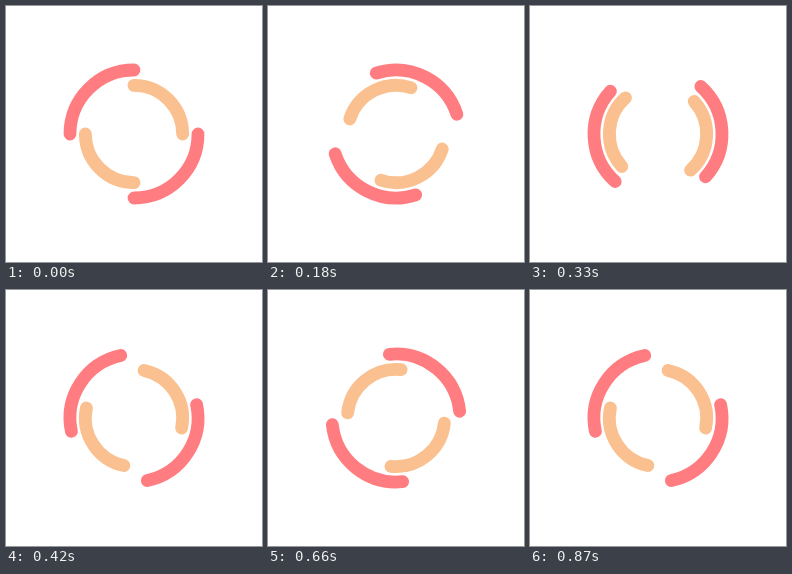
Write an HTML page that moves like this. It is 256 px wide and 256 px high and loops after 900 ms.

```html
<!DOCTYPE html>
<html lang="en">
<head>
<meta charset="utf-8">
<title>Double ring spinner</title>
<style>
  html, body { margin: 0; width: 100%; height: 100%; overflow: hidden; background: #fff; }
  svg { display: block; width: 100%; height: 100%; }
  path { fill: none; stroke-width: 5; stroke-linecap: round; }
</style>
</head>
<body>
<svg viewBox="-50 -50 100 100">
  <path id="outer" stroke="#ff7c81" d="M25 0A25 25 0 0 1 0 25M-25 0A25 25 0 0 1 0 -25"/>
  <path id="inner" stroke="#fac090" d="M0 -19A19 19 0 0 1 19 0M0 19A19 19 0 0 1 -19 0"/>
</svg>
<script>
  const LOOP = 900, STEP = 30;
  const outer = document.getElementById('outer');
  const inner = document.getElementById('inner');

  function draw() {
    // The small offset keeps rounding from holding a step too long.
    const time = Math.floor(performance.now() / STEP + 0.01) * STEP % LOOP;
    const angle = time / LOOP * 360;
    outer.setAttribute('transform', `rotate(${angle})`);
    inner.setAttribute('transform', `rotate(${-angle})`);
    requestAnimationFrame(draw);
  }
  draw();
</script>
</body>
</html>
```
